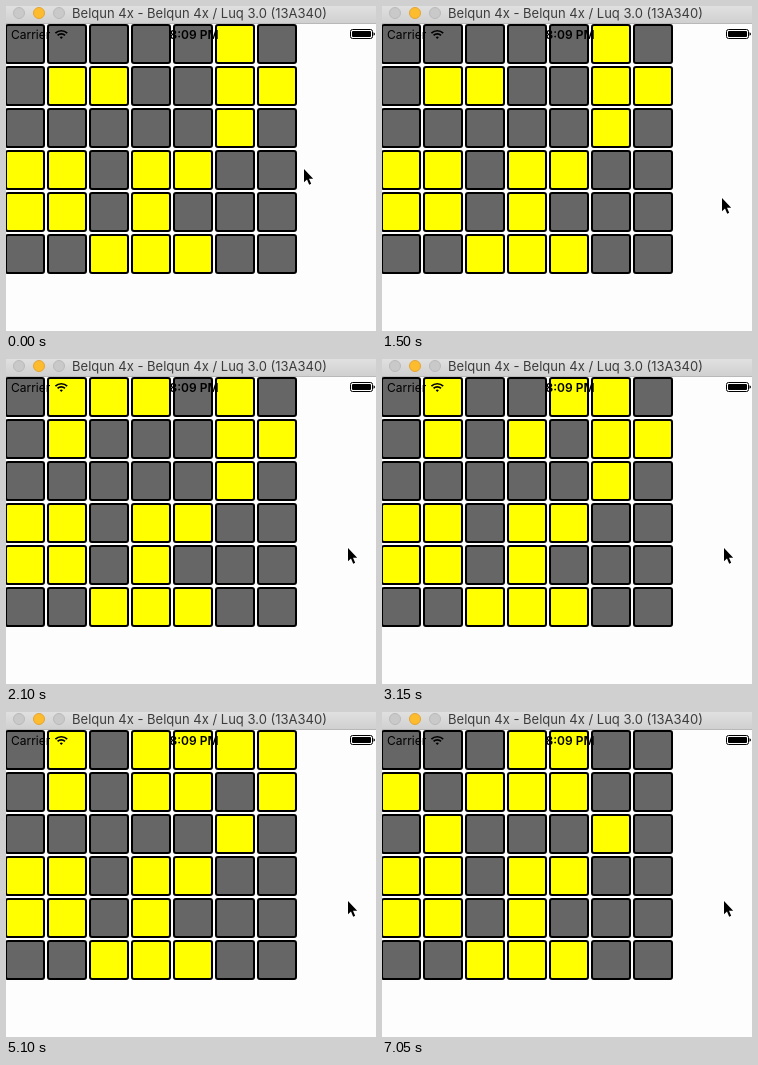
These frames come from a looping animation (370 by 325 pixels, 8000 ms). An HTML page:

```html
<!DOCTYPE html>
<html lang="en">
<head>
<meta charset="utf-8">
<title>Lights puzzle</title>
<style>
  html, body { margin: 0; width: 100%; height: 100%; overflow: hidden; background: #fdfdfd; }
  svg { display: block; }
  text { font-family: Inter, Roboto, sans-serif; }
  .title { font-size: 13px; fill: #3c3c3c; }
  .status { font-size: 12px; }
  .clock { font-weight: 600; }
  .cell { fill: #666; stroke: #000; stroke-width: 2; }
  .cell.lit { fill: #ff0; }
  .idle { fill: #c9c9c9; stroke: #bababa; }
  .wifi { fill: none; stroke: #000; stroke-width: 1.7; }
</style>
</head>
<body>
<svg width="370" height="325" viewBox="0 0 370 325">
  <defs>
    <linearGradient id="bar" x2="0" y2="1">
      <stop offset="0" stop-color="#e0e0e0"/>
      <stop offset="1" stop-color="#d0d0d0"/>
    </linearGradient>
  </defs>
  <rect width="370" height="325" fill="#fdfdfd"/>

  <rect width="370" height="17" fill="url(#bar)"/>
  <rect y="17" width="370" height="1" fill="#b8b8b8"/>
  <circle class="idle" cx="13" cy="7" r="5.5"/>
  <circle cx="33" cy="7" r="5.5" fill="#fdbc2e" stroke="#e3a435"/>
  <circle class="idle" cx="53" cy="7" r="5.5"/>
  <text class="title" x="193.5" y="12" text-anchor="middle">Belqun 4x - Belqun 4x / Luq 3.0 (13A340)</text>

  <g id="grid"></g>

  <text class="status" x="5" y="33">Carrier</text>
  <g class="wifi">
    <path d="M49.4 27.2a8.3 8.3 0 0 1 11.8 0"/>
    <path d="M51.6 29.4a5.2 5.2 0 0 1 7.4 0"/>
    <path d="M55.3 33l-1.6-1.8a2.3 2.3 0 0 1 3.2 0z" fill="#000" stroke="none"/>
  </g>
  <text class="status clock" x="188" y="33" text-anchor="middle">8:09 PM</text>
  <rect x="344.5" y="23.5" width="22" height="9" rx="2" fill="none" stroke="#000"/>
  <rect x="346" y="25" width="19" height="6" rx="1"/>
  <path d="M367.5 26.3q1.5.4 1.5 1.7t-1.5 1.7z"/>

  <path id="cursor" d="M2 1V14.2L5 11.4L7.2 16.7L9.2 15.8L7 10.7H11.2Z"
    fill="#000" stroke="#fff" stroke-width="2" paint-order="stroke"/>
  <circle id="ring" cx="343.5" cy="188.5" r="9.5" fill="none" stroke="#444" stroke-width="1.5"/>
</svg>
<script>
  const LOOP = 8000;
  const COLS = 7;
  const start = [
    '.....#.',
    '.##..##',
    '.....#.',
    '##.##..',
    '##.#...',
    '..###..'
  ];

  // [time, row, column]: a press flips the cell and its direct neighbours
  const presses = [
    [2100, 0, 2], [3150, 0, 3], [4050, 0, 4],
    [5100, 0, 5], [6150, 0, 6], [7050, 1, 1]
  ];

  // [time, x, y]
  const stops = [
    [0, 296, 162], [300, 303, 163], [600, 330, 166], [750, 333, 166],
    [900, 335, 173], [1050, 336, 193], [1500, 338, 191], [1650, 340, 188]
  ];

  const byId = id => document.getElementById(id);
  const grid = byId('grid');
  const cursor = byId('cursor');
  const ring = byId('ring');

  function makeCell(row, col) {
    const rect = document.createElementNS('http://www.w3.org/2000/svg', 'rect');
    const box = { x: 42 * col, y: 19 + 42 * row, width: 38, height: 38, rx: 2 };
    for (const key in box) rect.setAttribute(key, box[key]);
    return grid.appendChild(rect);
  }

  const cells = start.flatMap((line, row) =>
    [...line].map((mark, col) => ({ row, col, lit: mark === '#', rect: makeCell(row, col) })));

  function isLit(cell, time) {
    const flips = presses.filter(([at, row, col]) =>
      at <= time && Math.abs(row - cell.row) + Math.abs(col - cell.col) <= 1);
    return cell.lit !== (flips.length % 2 === 1);
  }

  function render() {
    const time = performance.now() % LOOP;
    for (const cell of cells) {
      cell.rect.setAttribute('class', isLit(cell, time) ? 'cell lit' : 'cell');
    }
    const [, x, y] = stops.filter(([at]) => at <= time).pop();
    cursor.setAttribute('transform', `translate(${x} ${y})`);
    ring.setAttribute('visibility', time >= 1950 && time < 2100 ? 'visible' : 'hidden');
    requestAnimationFrame(render);
  }
  render();
</script>
</body>
</html>
```
